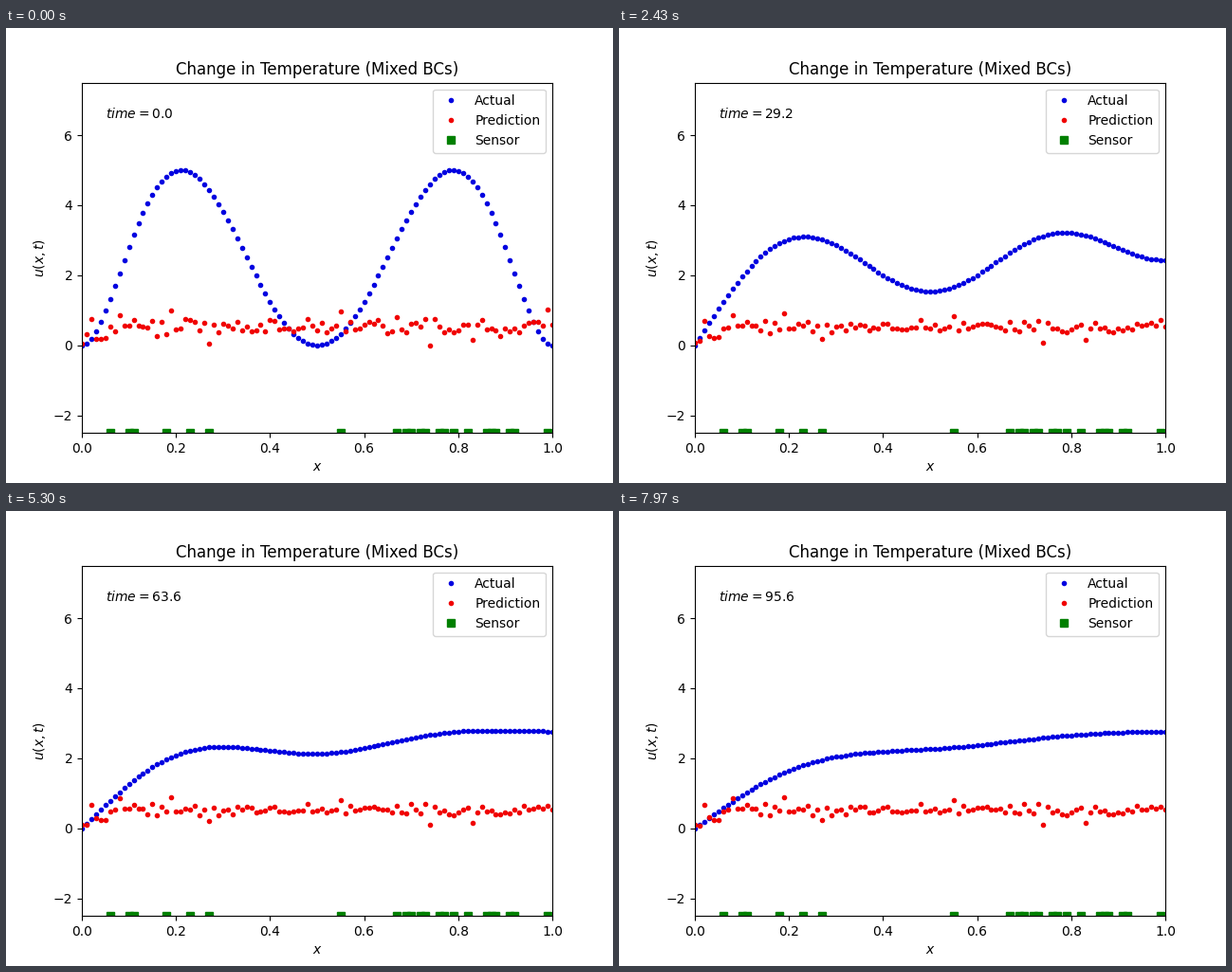
Animation, 640 px wide and 480 px high, one loop 8000 ms. Source, as a matplotlib script:

```python
import numpy as np
import matplotlib.pyplot as plt
from matplotlib.animation import FuncAnimation

LOOP_MS = 8000
STEPS = 240
FRAMES = STEPS + 1  # the last state is held for one extra frame
DT = 0.4            # simulated time per step
KAPPA = 3e-4        # thermal diffusivity
FADE = KAPPA * (4 * np.pi) ** 2
BLUE, RED, GREEN = "#0000e0", "#f00000", "#008000"

x = np.linspace(0, 1, 101)


def initial(s):
    return 2160 * (s * (s - 0.5) * (s - 1)) ** 2


# Heat equation with u = 0 on the left and an insulated right end.
fine = np.linspace(0, 1, 2001)
waves = (np.arange(90) + 0.5) * np.pi
coeffs = 2 * np.sin(np.outer(waves, fine)) @ initial(fine) * (fine[1] - fine[0])
modes = np.sin(np.outer(x, waves)) * coeffs


def actual(t):
    if t == 0:
        return initial(x)
    return modes @ np.exp(-KAPPA * waves ** 2 * t)


# Prediction: noise around a flat level, with a few outliers (x, start, end).
rng = np.random.default_rng(4)
settled = 0.53 + 0.085 * rng.standard_normal(x.size).clip(-2, 2)
start = settled + 0.1 * rng.standard_normal(x.size).clip(-2, 2)
outliers = [(0.00, 0.04, 0.10), (0.01, 0.32, 0.08), (0.03, 0.18, 0.31),
            (0.04, 0.18, 0.23), (0.05, 0.20, 0.25), (0.08, 0.86, 0.86),
            (0.19, 0.99, 0.89), (0.27, 0.05, 0.23), (0.55, 0.96, 0.80),
            (0.74, 0.00, 0.10), (0.83, 0.16, 0.16), (0.99, 1.03, 0.62)]
for pos, first, last in outliers:
    i = round(pos * 100)
    start[i], settled[i] = first, last


def predicted(t):
    return settled + (start - settled) * np.exp(-FADE * t)


sensors = np.array([6, 10, 11, 18, 23, 27, 55, 67, 69, 70, 72, 73,
                    76, 77, 79, 82, 86, 87, 88, 91, 92, 99]) / 100

fig, ax = plt.subplots(figsize=(6.4, 4.8), dpi=100)
ax.set(xlim=(0, 1), ylim=(-2.5, 7.5), xlabel="$x$", ylabel="$u(x,t)$",
       title="Change in Temperature (Mixed BCs)")
blue, = ax.plot(x, actual(0), ".", color=BLUE, label="Actual")
red, = ax.plot(x, predicted(0), ".", color=RED, label="Prediction")
ax.plot(sensors, np.full_like(sensors, -2.5), "s", color=GREEN, label="Sensor")
clock = ax.text(0.05, 0.9, "", transform=ax.transAxes)
ax.legend(loc="upper right")


def update(frame):
    t = min(frame, STEPS - 1) * DT
    blue.set_ydata(actual(t))
    red.set_ydata(predicted(t))
    clock.set_text(f"$time = {t:.1f}$")
    return blue, red, clock


anim = FuncAnimation(fig, update, frames=FRAMES, interval=LOOP_MS / FRAMES,
                     repeat=True, repeat_delay=0)
plt.show()
```
